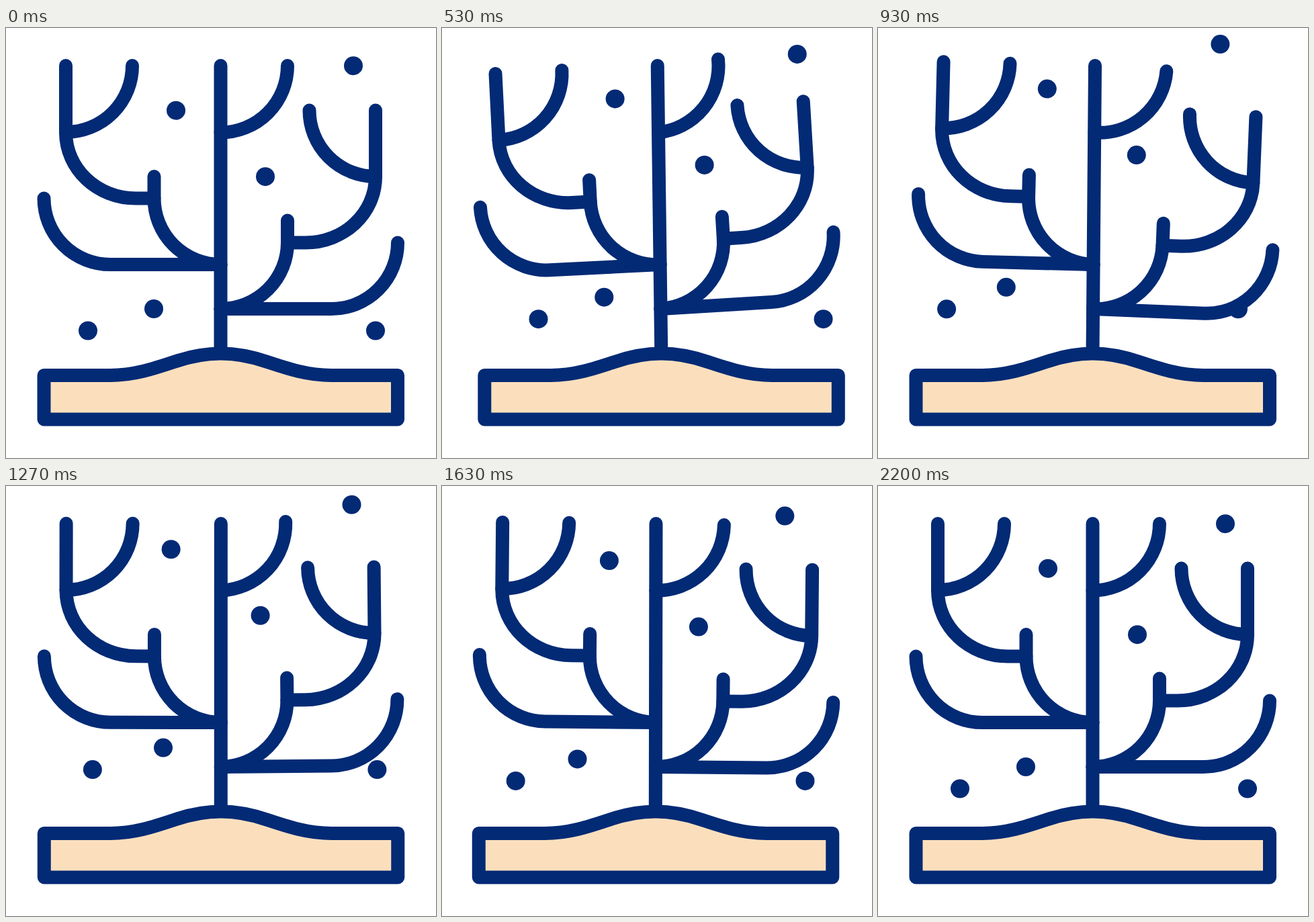
Recreate the animation shown at these times as an HTML page. Size 640x640 px, loop 2.47 s.

```html
<!DOCTYPE html>
<html lang="en">
<head>
<meta charset="utf-8">
<title>Tree in the wind</title>
<style>
  html, body { margin: 0; width: 100%; height: 100%; overflow: hidden; background: #fff; }
  svg { display: block; width: 100%; height: 100%; }
  .line { fill: none; stroke: #032a75; stroke-width: 20; stroke-linecap: round; stroke-linejoin: round; }
  .soil { fill: #fbdfbd; }
  .snow { fill: #032a75; }
</style>
</head>
<body>
<svg viewBox="0 0 640 640">
  <g id="ground">
    <g id="tree" class="line">
      <path d="M319.5 56V486"/>
      <g id="left">
        <path d="M319.5 352H155A98.5 98.5 0 0 1 56.5 253.5"/>
        <path d="M319.5 352A99 98.5 0 0 1 220.5 253.5V221"/>
        <path d="M220.5 253.5H193C136 253.5 89 210 89 155V56"/>
        <path d="M188 56A99 99 0 0 1 89 155"/>
      </g>
      <g id="right">
        <path d="M319.5 418H484.5A98.5 98.5 0 0 0 583 319.5"/>
        <path d="M319.5 418A99.5 98.5 0 0 0 419 319.5V286.5"/>
        <path d="M419 319.5H446C503 319.5 550 276 550 221V122.5"/>
        <path d="M451.5 122.5A98.5 98.5 0 0 0 550 221"/>
      </g>
      <path id="top" d="M419 56A99.5 99.5 0 0 1 319.5 155.5"/>
    </g>
    <path class="line soil" d="M56.5 517H155C190 517 220 507 250 497C273 489 296 484.5 319.5 484.5S366 489 389 497C419 507 449 517 484.5 517H583V582.5H56.5Z"/>
  </g>
  <g id="flakes" class="snow"></g>
</svg>
<script>
const FPS = 30, LOOP = 2470, LAST = 66;
const $ = id => document.getElementById(id);

// [frame, value] keys, eased in and out between neighbours
function ease(keys, f) {
  if (f <= keys[0][0]) return keys[0][1];
  for (let i = 1; i < keys.length; i++) {
    const [a, u] = keys[i - 1], [b, v] = keys[i];
    if (f < b) {
      const t = (f - a) / (b - a);
      return u + (v - u) * t * t * (3 - 2 * t);
    }
  }
  return keys[keys.length - 1][1];
}

// Damped swing: extremes every 10 frames from frame 12
const swing = (vals, lag = 0, end = 52 + lag, start = 0) =>
  [[start, 0], ...vals.map((v, i) => [12 + 10 * i + lag, v]), [end, 0]];

const slide = swing([26, -28.5, 15.5, -8]);
const joints = [
  { el: $('tree'), y: 485, keys: swing([-2.67, 2.8, -0.8, 0.45]) },
  { el: $('left'), y: 352, keys: swing([-4.87, 4.85, -1.9, 1.5], 0.5) },
  { el: $('right'), y: 418, keys: swing([-3.73, 3.89, -1.2, 0.5], 1.7, LAST) },
  { el: $('top'), y: 155.5, keys: swing([-5.37, 6, -2.6, 1.2], 3, LAST) }
];

const drift = swing([23, -29.2, 14, -19]);
const lift = [[0, 0], [31, -33], [61, 0]];
const flakes = [
  [517, 56.2, 1], [253, 122.7, 0], [386, 221.2, 0],
  [220, 418, 6], [122, 450.5, 3], [550, 450.5, 2]
].map(([x, y, lag]) => {
  const el = document.createElementNS('http://www.w3.org/2000/svg', 'circle');
  el.setAttribute('r', 14);
  $('flakes').append(el);
  return { el, x, y, lag };
});

function draw(ms) {
  const f = Math.min(LAST, Math.floor((ms % LOOP + 4) * FPS / 1000));
  $('ground').setAttribute('transform', `translate(${ease(slide, f)})`);
  for (const { el, y, keys } of joints)
    el.setAttribute('transform', `rotate(${ease(keys, f)} 319.5 ${y})`);
  const dy = ease(lift, f);
  for (const { el, x, y, lag } of flakes) {
    el.setAttribute('cx', x + ease(drift, f - lag));
    el.setAttribute('cy', y + dy);
  }
}

const begin = performance.now();
function tick() {
  draw(performance.now() - begin);
  requestAnimationFrame(tick);
}
tick();
</script>
</body>
</html>
```
